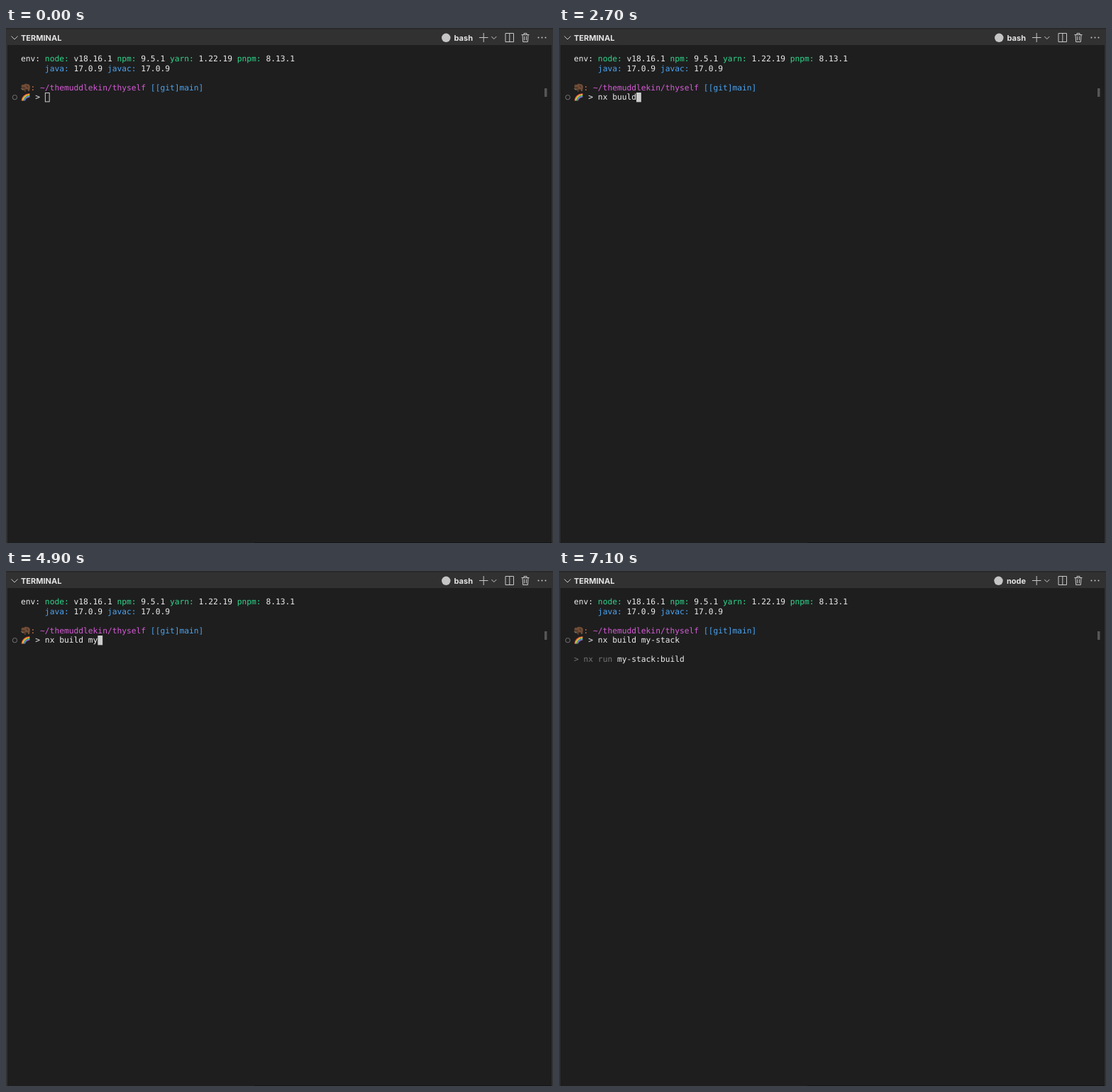
An HTML page that plays this animation: 771 by 726 pixels, repeating every 8 s.

```html
<!DOCTYPE html>
<html lang="en">
<head>
<meta charset="utf-8">
<title>Terminal</title>
<style>
  html, body { margin: 0; width: 100%; height: 100%; overflow: hidden; background: #1e1e1e; }
  svg { display: block; width: 100%; height: 100%; }
  text { white-space: pre; text-rendering: geometricPrecision; }
  .mono { font: 11.25px "DejaVu Sans Mono", monospace; }
  .label { font: 700 11px Inter, sans-serif; fill: #e4e4e4; }
  .icon { fill: none; stroke: #c8c8c8; stroke-width: 1; }
  .white { fill: #ececec; }
  .green { fill: #2fd68c; }
  .blue { fill: #4ba3f0; }
  .magenta { fill: #d65bd6; }
  .orange { fill: #d9774c; }
  .dim { fill: #747474; }
</style>
</head>
<body>
<svg viewBox="0 0 771 726">
  <rect width="771" height="726" fill="#1e1e1e"/>
  <path d="M0 0H771V726H769V24H2V726H0Z" fill="#313132"/>
  <path d="M0 1H771" stroke="#2a2a2b" stroke-width="2"/>
  <path d="M350 725.5H769" stroke="#141414"/>

  <path class="icon" d="M7.5 11.5L12 16L16.5 11.5"/>
  <text class="label" x="21" y="17.5">TERMINAL</text>
  <circle id="shell-icon" cx="620.3" cy="13.8" r="6.2" fill="#c5c5c5"/>
  <text id="shell" class="label" x="658" y="17.5" text-anchor="end"></text>
  <g class="icon">
    <path d="M667 13.5H679.5M673.2 7V20"/>
    <path d="M684.3 12L687.8 15.5L691.3 12"/>
    <path d="M704 7.5H715.5V19.5H704ZM709.8 7.5V19.5"/>
    <path d="M726.5 9.5H737.5M730 9.5V7.5H734V9.5M728 9.5L728.6 19.5H735.4L736 9.5M730.6 11.5V17.5M733.4 11.5V17.5"/>
  </g>
  <g fill="#c8c8c8">
    <circle cx="750.5" cy="13.5" r="1"/>
    <circle cx="755.5" cy="13.5" r="1"/>
    <circle cx="760.5" cy="13.5" r="1"/>
  </g>
  <rect x="759" y="85" width="3.5" height="12" fill="#565656"/>

  <g id="screen" class="mono"></g>

  <!-- woolly animal -->
  <path d="M21.5 82Q22 79 25 80Q27 77.5 30 79Q33.5 79 34 83L33 89H31L30.5 86.5L28.5 86.5L28 89.5H26L25.5 86.5Q22 86 21.5 82Z" fill="#704c36"/>
  <path d="M23 83Q25 86 27 84M29 81L31 84M28 86L27 89" fill="none" stroke="#38261d"/>
  <path d="M21.5 85Q22.5 87.5 25 87" fill="none" stroke="#b99b7d" stroke-width=".9"/>

  <g id="rainbow" fill="none" stroke-width="1.1"></g>
  <circle cx="12.4" cy="97.7" r="3.2" fill="none" stroke="#737373"/>
  <text id="typed" class="mono white"></text>
  <rect id="cursor" width="6.8" height="13.2"/>
</svg>
<script>
const LOOP = 8000;
const FOCUS = 500, ENTER = 5900, RENAME = 6200, HIDE = 6800, OUTPUT = 7100;
const $ = id => document.getElementById(id);
const colX = col => 21 + col * 6.773;
const baseline = row => 47.4 + row * 13.5;

function svg(parent, tag, attrs, content = "") {
  const el = document.createElementNS(parent.namespaceURI, tag);
  for (const key in attrs) el.setAttribute(key, attrs[key]);
  el.textContent = content;
  return parent.appendChild(el);
}

// Writes [colour, text] runs along the character grid.
function line(row, col, runs) {
  const group = svg($("screen"), "g", {});
  for (const [color, text] of runs) {
    svg(group, "text", { x: colX(col), y: baseline(row), class: color }, text);
    col += text.length + 1;
  }
  return group;
}

line(0, 0, [
  ["white", "env:"], ["green", "node:"], ["white", "v18.16.1"],
  ["green", "npm:"], ["white", "9.5.1"], ["green", "yarn:"],
  ["white", "1.22.19"], ["green", "pnpm:"], ["white", "8.13.1"]
]);
line(1, 5, [["blue", "java:"], ["white", "17.0.9"], ["blue", "javac:"], ["white", "17.0.9"]]);
line(3, 2, [["orange", ":"]]);
line(3, 4, [["magenta", "~/themuddlekin/thyself"], ["blue", "[[git]main]"]]);
line(4, 3, [["white", ">"]]);
const output = line(6, 0, [["dim", "> nx run"], ["white", "my-stack:build"]]);

["#e8493f", "#f39a32", "#f4dc4c", "#58bd59", "#479be0", "#9864c4"].forEach((stroke, i) => {
  const o = i * 0.9;
  svg($("rainbow"), "path", {
    d: `M${22 + o} 102.5Q${23 + o} ${93.5 + o} 33.3 ${92.5 + o}`, stroke
  });
});

// Each "<" is a backspace; every group starts at its time and adds a key per 100 ms.
const bursts = [
  [1200, ["n", "x", " ", "b", "u"]],
  [1800, ["u"]],
  [2000, ["l", "d", " ", "m"]],
  [2500, ["<"]],
  [2700, ["<", "<", "<"]],
  [3400, ["<", "i"]],
  [3700, ["l", "d", " "]],
  [4200, ["m", "y", "s"]],
  [4900, ["<"]],
  [5100, ["-", "s"]],
  [5400, ["t", "a", "ck"]]
];
const keys = bursts.flatMap(([start, list]) => list.map((key, i) => [start + i * 100, key]));

function typedAt(t) {
  return keys.reduce((text, [at, key]) =>
    t < at ? text : key === "<" ? text.slice(0, -1) : text + key, "");
}

$("typed").setAttribute("x", colX(5));
$("typed").setAttribute("y", baseline(4));

function placeCursor(t, length) {
  const entered = t >= ENTER, focused = t >= FOCUS;
  const inset = focused ? 0 : 0.5;
  const attrs = {
    x: colX(entered ? 0 : 5 + length) + inset,
    y: baseline(entered ? 5 : 4) - 10.4 + inset,
    width: 6.8 - inset * 2,
    height: 13.4 - inset * 2,
    fill: focused ? "#cccccc" : "none",
    stroke: focused ? "none" : "#cccccc",
    visibility: t < HIDE ? "visible" : "hidden"
  };
  for (const key in attrs) $("cursor").setAttribute(key, attrs[key]);
}

function draw() {
  const t = performance.now() % LOOP;
  const text = typedAt(t);
  $("typed").textContent = text;
  placeCursor(t, text.length);
  $("shell").textContent = t < RENAME ? "bash" : "node";
  $("shell-icon").setAttribute("cx", t < RENAME ? 620.3 : 619.5);
  output.setAttribute("visibility", t < OUTPUT ? "hidden" : "visible");
  requestAnimationFrame(draw);
}
draw();
</script>
</body>
</html>
```
